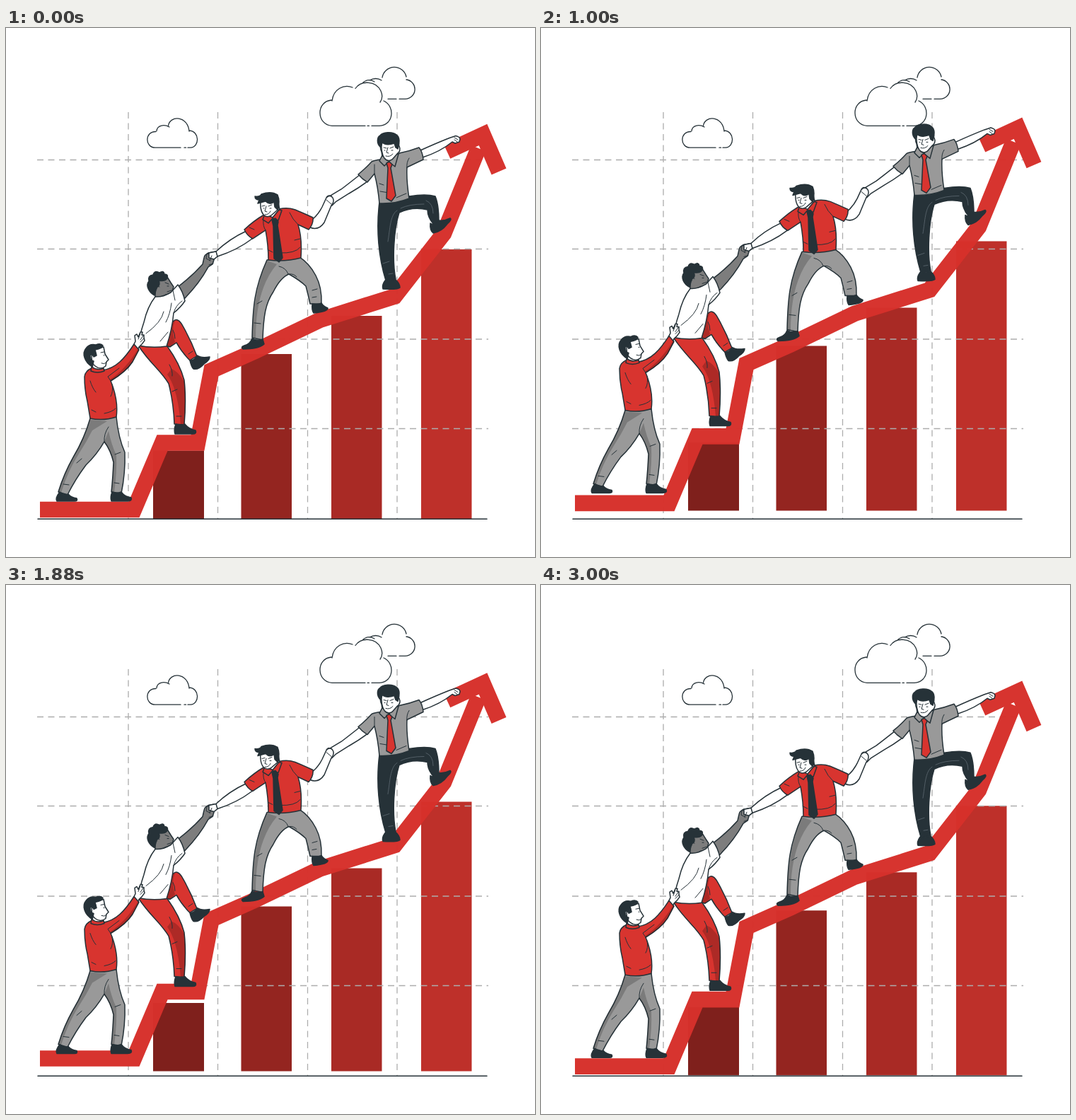
These frames come from a looping animation (748x748 px, 3040 ms). An HTML page:

```html
<!DOCTYPE html>
<html lang="en">
<head>
<meta charset="utf-8">
<title>Climbing the chart together</title>
<style>
html, body { margin: 0; width: 100%; height: 100%; overflow: hidden; background: #fff; }
svg { display: block; width: 100%; height: 100%; }
.ink { fill: none; stroke: #263238; stroke-width: 1.5; stroke-linecap: round; stroke-linejoin: round; }
.white { fill: #fff; }
.red { fill: #d8342f; }
.gray { fill: #999; }
.skin { fill: #7d7d7d; }
.dark { fill: #263238; }
.shade { fill: #000; fill-opacity: .2; stroke: none; }
.thin { stroke-width: 1; }
.pale { stroke: #66727a; stroke-width: .7; }
#grid { fill: none; stroke: #adadad; stroke-width: 1.3; stroke-dasharray: 9 6.5; }
#arrow { fill: none; stroke: #d7302b; stroke-width: 22.7; stroke-miterlimit: 9; opacity: .98; }
</style>
</head>
<body>
<svg viewBox="0 0 748 748">
  <g id="bars">
    <path fill="#7f201c" d="M208 597.500h72V694h-72z"/>
    <path fill="#942520" d="M332.500 461H404V694h-71.500z"/>
    <path fill="#a92a25" d="M460 407h71.500V694H460z"/>
    <path fill="#be302a" d="M587 313h71.500V694H587z"/>
  </g>
  <path id="grid" d="M44 186.500H682M44 312.500H682M44 440H682M44 566.500H682M173 119V694M299.500 119V694M426.500 119V694M553 119V694"/>
  <path class="ink" stroke-linecap="butt" d="M45 694.300H680"/>

  <g class="ink" style="stroke-width:1.3">
    <path class="white" stroke="none" d="M505 76Q518 70 532 72A17 17 0 0 1 566 73A14 14 0 0 1 563 100.500H541Z"/>
    <path d="M505 77C511 72 516 73 521 76M514 74Q523 69 531 74M532 70A17.300 17.300 0 0 1 566 69M566 73A13.700 13.700 0 0 1 564 100.300H556M552 100.300H540"/>
    <path class="white" stroke="none" d="M461 138.300A17 17 0 0 1 461 103Q470 79 495 86A22 22 0 0 1 532 103A17.500 17.500 0 0 1 528 138.300Z"/>
    <path d="M508 138.300H461C439 137 438 104 460 102M461 103C463 86 478 79 490 84M494 85.500C502 74 523 74 530 89Q534 98 529 105M534 103C550 110 549 137 528 138.300H517M513.500 138.300H511"/>
    <path d="M247 169.200H211C196 169 196 146 212 146.500M213 145.500C214 137 224 136 231 140M229.500 138C232 123 257 124 259 146M259 145C274 146 274 168 261 169.200H257M254.500 169.200H252"/>
  </g>

  <g id="arrow">
    <path d="M48 681H181L221 586.500H271L290.500 484.300L352.500 456.800L443.500 413L549.500 379.500L619 290.500L668 170"/>
    <path d="M623.500 174.500L674.500 151L697 203"/>
  </g>

  <g id="team" class="ink">
    <!-- leader -->
    <path class="white" d="M586 173Q608 163 627 155.500L636 152.500Q642 154 642 157L641 161L635 163L631 161Q614 175 589 183Z"/>
    <path class="thin" d="M634 155L639 158M634 158L638 161"/>
    <path class="white" d="M501 207Q482 222 474 228L459 237Q453 238 453 243L455 252L461 251L466 246L485 234Q499 226 511 217Z"/>
    <path class="dark" d="M528 246C523 285 527 325 537 357L551 355C546 330 548 286 556 261Q575 252 596 257Q596 268 605 278L612 273Q612 250 607 238Q594 234 570 238Z"/>
    <path class="pale" d="M553 258C543 264 543 285 540 302M558 255Q570 249 591 249M594 244Q604 248 604 262M533 333L542 330M541 348L547 347"/>
    <path class="dark" d="M600 276Q604 280 612 272Q620 273 628 269Q631 271 624 277Q616 288 604 290Q599 286 600 276Z"/>
    <path class="dark" d="M536 357Q543 358 550 355Q557 361 557 367Q555 370 533 369Q531 364 536 357Z"/>
    <path class="gray" d="M530 186Q521 187 517 189Q508 199 498 207Q504 214 511 218L521 206Q526 225 528 248Q550 249 570 241Q566 215 567 197L590 186Q589 175 584 169Q571 174 556 177L541 190Z"/>
    <path class="thin" d="M521 193V207M567 198Q566 190 570 184M541 233L529 231M552 240Q561 236 566 234M528 220L534 222"/>
    <path class="white" d="M531 163Q528 169 531 175L533 187L542 190L552 179Q558 170 553 163Z"/>
    <path class="gray" d="M532 180L528 188L535 195L541 189L550 196L555 178L550 179L542 188Z"/>
    <path class="white" d="M531 160Q530 177 535 184Q540 190 546 186L553 178Q559 174 556 167L551 160Z"/>
    <path class="dark" d="M530 169C523 163 525 154 529 152C532 147 547 146 552 151C557 154 557 163 554 171L551 169L549 163Q538 167 532 162Z"/>
    <path class="thin" d="M534 169L538 170M543 170L548 168M540 169L538 176L541 177M537 181Q543 183 547 178M535 173h1M545 173h2"/>
    <path class="red" d="M538 191L542 189L546 193L544 198L551 237L545 245L538 241L540 198Z"/>

    <!-- second climber -->
    <path class="white" d="M434 270Q442 263 447 253L453 240Q458 235 462 240Q465 246 460 251L450 275Q442 287 430 282Z"/>
    <path class="thin" d="M453 243L460 249M453 239Q455 235 461 238"/>
    <path class="white" d="M340 287Q316 298 297 316L286 318Q282 320 286 326L294 327L299 323Q327 314 348 298Z"/>
    <path class="gray" d="M369 328C351 368 349 395 348 438L363 441C364 407 367 389 378 373Q388 353 400 348Q416 357 424 365Q427 376 430 390L446 390Q447 367 438 350Q429 333 415 324Z"/>
    <path class="shade" d="M369 329Q350 370 348 438L353 439Q353 396 364 367Q371 348 383 334Z"/>
    <path class="thin" d="M399 348Q396 339 386 337M400 348Q407 347 411 352M355 390L362 386M351 417L360 418M433 371L440 369M433 381L439 380"/>
    <path class="dark" d="M348 439Q355 443 363 440L365 447Q357 454 335 454Q331 451 337 449Q345 447 348 439Z"/>
    <path class="dark" d="M433 390Q440 392 446 389Q449 394 455 396Q456 401 435 403Q432 399 433 390Z"/>
    <path class="red" d="M365 264Q351 272 337 285Q341 294 349 298L367 286Q371 308 371 328Q394 331 417 325Q419 297 413 278L428 285Q435 277 434 268Q421 262 409 257Q398 253 386 256L376 270Z"/>
    <path class="thin" d="M367 286Q363 280 364 272M413 278L406 270L401 261M387 318Q409 319 416 310M408 300L416 298M371 314L377 317M344 282L351 285"/>
    <path class="white" d="M361 250L366 267L376 270L387 256L384 246Z"/>
    <path class="red" d="M366 263L363 271L371 276L377 269L385 272L390 258L386 257L377 268Z"/>
    <path class="white" d="M360 245Q359 258 364 264Q369 269 375 265L383 258Q388 254 384 244Z"/>
    <path class="dark" d="M352 238Q359 239 361 235Q375 230 384 236Q388 245 384 257L380 253L379 246Q373 251 367 245L356 248L358 243Q352 243 352 238Z"/>
    <path class="thin" d="M362 252L366 251M371 252L376 250M368 252L366 259L369 260M366 264Q372 264 374 259M364 255h1M373 255h2"/>
    <path class="dark" d="M376 271L381 269L385 274L384 279L391 325L386 331L379 326L378 280Z"/>

    <!-- third climber -->
    <path class="skin" d="M243 366Q264 350 278 334L280 325Q281 319 287 319Q294 322 294 328L292 334L286 338Q273 362 251 384Z"/>
    <path class="white" d="M287 318L297 316L299 323L294 327L287 325Z"/>
    <path class="thin" d="M284 319L283 326L289 329M288 329L291 322M287 335L293 333"/>
    <path class="red" d="M225 449Q229 422 236 415Q242 409 248 418Q261 440 270 464L260 470Q248 458 241 445L232 451Z"/>
    <path class="shade" d="M225 449Q229 422 236 415L239 414Q233 427 239 444L232 451Z"/>
    <path class="dark" d="M260 470Q267 470 270 463Q276 467 288 465Q288 470 280 475Q272 484 265 482Q262 479 260 470Z"/>
    <path class="red" d="M187 449C204 475 219 484 230 503Q237 530 238 560L252 561Q255 525 252 498Q246 475 228 450Z"/>
    <path class="shade" d="M228 490Q243 510 247 561L252 561Q255 525 252 500Q243 485 234 482Z"/>
    <path class="thin" d="M231 476Q236 485 235 492M235 514L242 511M241 549L248 549M236 427Q239 432 239 439M258 461L264 457"/>
    <path class="dark" d="M240 560Q247 563 253 560Q258 567 268 569Q270 574 264 574H239Q237 568 240 560Z"/>
    <path class="skin" d="M211 366L211 381Q221 381 226 377Q235 380 235 372L237 366L233 360L228 352L213 356Z"/>
    <path class="white" d="M211 380Q200 394 195 416Q189 434 187 449Q207 453 227 450Q235 426 237 403Q247 395 253 386Q250 372 243 363L233 374Q221 381 211 380Z"/>
    <path class="thin" d="M237 403Q240 392 249 386M236 371L239 385M223 401Q220 416 198 432M234 389Q232 405 226 416M229 430L218 443"/>
    <path class="dark" d="M210 378C202 374 197 364 202 358Q200 350 208 349Q210 342 217 346Q223 342 224 348Q230 348 228 354Q224 359 216 357Q219 364 213 367Z"/>
    <path class="thin" d="M225 360L230 362M228 365h2M228 373L234 371M217 366Q213 363 213 369"/>

    <!-- helper at the bottom -->
    <path class="gray" d="M119 552Q111 580 95 607Q82 630 74 656L87 660Q98 638 113 618Q128 604 139 585Q148 597 152 614Q151 637 149 656L163 658Q169 629 168 600Q159 580 156 550Z"/>
    <path class="shade" d="M119 554Q111 580 95 607Q82 630 74 656L78 657Q87 627 103 602Q114 585 122 569L143 556ZM139 585Q148 597 152 614Q151 637 149 656L153 657Q157 627 156 604Q149 589 145 570Z"/>
    <path class="thin" d="M139 585Q138 574 145 564M100 615L107 609M81 645L89 646M154 603L162 600M153 643L160 644"/>
    <path class="dark" d="M76 656Q82 661 88 659Q92 664 100 665Q102 669 97 669H72Q69 665 76 656Z"/>
    <path class="dark" d="M150 656Q156 659 163 656Q168 663 177 664Q179 669 172 669H149Q147 664 150 656Z"/>
    <path class="white" d="M180 449L183 443L182 435L185 433L187 437L190 430L193 430L192 434L195 434L195 438L196 442Q193 447 188 451L185 458Z"/>
    <path class="thin" d="M187 440L190 432M190 441L194 435M190 444L195 439"/>
    <path class="red" d="M121 481Q112 485 111 493Q111 512 115 528L119 552Q137 556 156 550Q159 529 150 504L148 499Q170 486 179 472L188 455L181 447Q170 464 161 472Q150 482 136 484Z"/>
    <path class="shade" d="M147 497Q170 482 187 453L188 456L179 472Q170 486 149 500Z"/>
    <path class="thin" d="M148 499L144 493L160 481M150 504Q152 514 148 521M119 499Q122 509 127 515M139 545Q150 543 155 538M121 540L127 543"/>
    <path class="white" d="M123 473L122 483Q130 487 137 483L136 480Z"/>
    <path class="red" d="M121 479Q129 485 138 481L139 485Q129 489 120 485Z"/>
    <path class="white" d="M122 458Q119 473 126 478Q134 484 141 478L142 472L145 469L140 461L138 451L126 454Z"/>
    <path class="dark" d="M122 479C111 473 107 460 113 453Q118 446 127 448Q134 445 137 449Q137 453 126 455L128 463L124 465Q122 460 119 463Q119 470 124 471Z"/>
    <path class="thin" d="M134 459L139 458M138 463h1M135 474Q139 476 142 473"/>
  </g>
</svg>
<script>
const LOOP = 3040;
// [time in ms, vertical offset]
const arrowPath = [[0, 0], [580, -5.1], [1000, -9.2], [1330, -12.9], [1520, -15], [1880, -11.5], [2380, -6.4], [LOOP, 0]];
const bobPath = [[0, 0], [580, -10.7], [800, -15], [1000, -11.6], [1330, -3.7], [1520, 0], [1880, -6.5], [2270, -15], [2380, -13.3], [LOOP, 0]];
const [arrow, bars, team] = ["arrow", "bars", "team"].map(id => document.getElementById(id));

function offsetAt(path, t) {
  const i = path.findIndex(([time]) => time > t);
  const [t0, y0] = path[i - 1], [t1, y1] = path[i];
  return y0 + (y1 - y0) * (t - t0) / (t1 - t0);
}

function moveY(node, y) {
  node.setAttribute("transform", `translate(0 ${y.toFixed(2)})`);
}

function draw() {
  const t = performance.now() % LOOP;
  const bob = offsetAt(bobPath, t);
  moveY(arrow, offsetAt(arrowPath, t));
  moveY(bars, bob);
  moveY(team, bob);
  requestAnimationFrame(draw);
}
draw();
</script>
</body>
</html>
```
